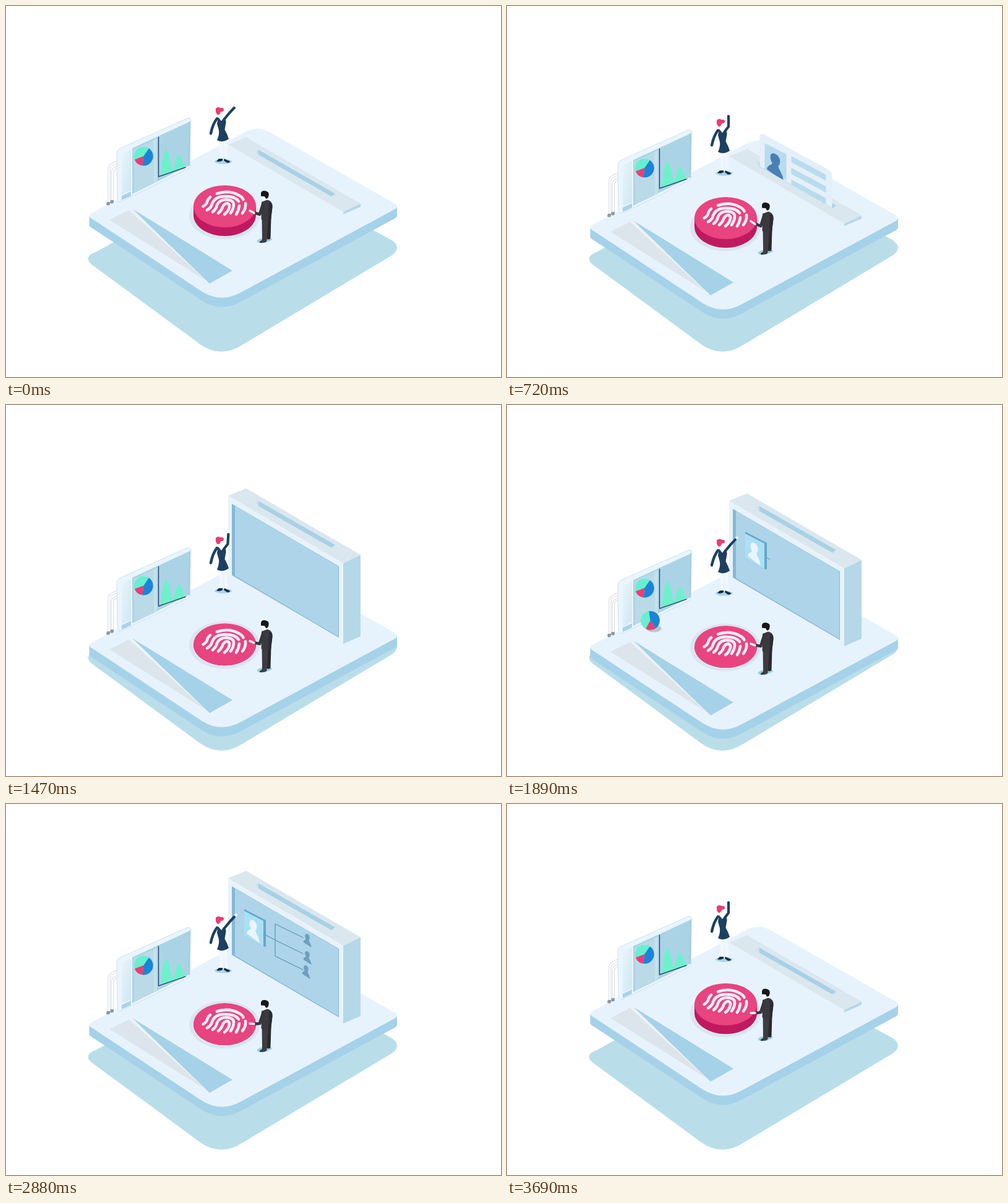
An HTML page for the animation above (3.72 s loop, 800 px wide and 600 px high).

```html
<!DOCTYPE html>
<html lang="en">
<head>
<meta charset="utf-8">
<title>Isometric access platform</title>
<style>
html, body { margin: 0; width: 100%; height: 100%; overflow: hidden; background: #fff; }
svg { display: block; width: 800px; height: 600px; }
.line { fill: none; stroke-linecap: round; stroke-linejoin: round; }
</style>
</head>
<body>
<svg viewBox="0 0 800 600" xmlns="http://www.w3.org/2000/svg">
  <defs>
    <path id="slab" d="M142 333C132 338 132 340 142 346L317 462Q348 481 380 463L624 331Q640 324 624 317L424 203Q407 194 388 203Z"/>
    <g id="pie">
      <circle r="15.3" fill="#66f0d0"/>
      <path d="M0 0L8.6-12.7A15.3 15.3 0 0 1-1.9 15.2Z" fill="#1c84d8"/>
      <path d="M0 0L-1.9 15.2A15.3 15.3 0 0 1-14.4 5.2Z" fill="#ee3c74"/>
    </g>
    <path id="bust" d="M-7 10C-7 5-3 4-2.5 1C-5-2-5-10 0-10C5-10 5-2 2.5 1.5C3 5 7 8 7 15Z"/>
    <clipPath id="slotClip"><path d="M380-400H640V373L408 240L380 224Z"/></clipPath>
    <clipPath id="rampClip"><path d="M100 200H420V507L167 346H100Z"/></clipPath>
    <clipPath id="screenClip"><polygon id="screenCut"/></clipPath>
    <linearGradient id="glass" x1="0" y1="0" x2="1" y2="1">
      <stop offset="0" stop-color="#e9f5fb"/><stop offset="1" stop-color="#cfe6f2"/>
    </linearGradient>
  </defs>

  <path fill="#b9deea" d="M145 398C130 403 129 412 141 420L315 548Q348 570 382 548L624 403Q640 391 624 379L400 258Z"/>

  <g id="deck">
    <use href="#slab" y="15" fill="#a5d2e9"/>
    <path d="M134.5 340L632 324V339L134.5 355Z" fill="#a5d2e9"/>
    <use href="#slab" fill="#e7f3fc"/>

    <!-- ramp -->
    <path d="M167 346L203 327L366 428L329 449Z" fill="#edf2f6"/>
    <path d="M167 346L199 330L323 444Z" fill="#dde5ec"/>
    <path d="M204 328L366 428L329 449Z" fill="#a5d2e8"/>

    <!-- dashboard -->
    <g class="line" stroke="#d8dde2" stroke-width="4.5">
      <path d="M166.5 317V264Q167 256 180 253M172 314V269Q172 263 182 260"/>
      <path d="M166.5 316V264Q167 256 180 253M172 313V269Q172 263 182 260" stroke="#fff" stroke-width="2.4"/>
    </g>
    <path d="M163 317h5v4q-3 3-6 0ZM169 314h5v4q-3 3-6 0Z" fill="#8f979f"/>
    <path d="M179 239Q179 233 185 230L292 182Q299 180 299 187L297.5 259Q297 262 295 263L189 315Q180 319 180 312Z" fill="#eaf5fc" stroke="#c9e3f0"/>
    <path d="M187 239L202 232V298L187 305Z" fill="url(#glass)"/>
    <path d="M187 307L202 300V307L187 314Z" fill="#a9d2e9"/>
    <path d="M204 230L297 187L296 258L204 304Z" fill="#abd3e6"/>
    <path d="M206 232L238 217L239 287L207 302Z" fill="#bbdae8"/>
    <path d="M238 217L244 214V285L239 287Z" fill="#c4e1ee"/>
    <path d="M250 274C252 248 256 233 259 233C264 234 266 255 269 265C273 263 275 242 279 241C284 241 286 255 290 261Z" fill="#6ff0cc"/>
    <path class="line" d="M246.5 212V276L290 261" stroke="#24496b" stroke-width="1.4"/>
    <path class="line" d="M297 187L296 258" stroke="#8bb9cd"/>
    <use href="#pie" x="222.3" y="243"/>

    <!-- button -->
    <ellipse cx="353" cy="339" rx="57" ry="38.5" fill="#d9e6f1"/>
    <path id="side" fill="#c01960"/>
    <g id="cap">
      <ellipse cx="353.5" cy="324" rx="50.5" ry="34" fill="#e8447f"/>
      <g class="line" stroke="#f1eef6" stroke-width="4.6">
        <path d="M341 303.5Q360 297 376 306Q382 309 383.5 313"/>
        <path d="M318.5 324Q324 321 325 317Q326 312 330 309"/>
        <path d="M325 330Q332 326 333 320Q337 309 351 308Q370 307 376 316"/>
        <path d="M334 333Q340 328 341 322Q345 313 356 313Q368 314 368 321Q368 328 363 335"/>
        <path d="M343 335Q349 330 350 325Q353 319 358 319Q362 321 361 325Q359 333 353 337"/>
        <path d="M387 319Q388 328 382 335M377 323Q376 331 372 337"/>
      </g>
    </g>

    <!-- wall -->
    <polygon id="wallSide" fill="#b5d8e8"/>
    <polygon id="wallFront" fill="#e8f2fa"/>
    <g id="screen">
      <polygon id="screenEdge" fill="#85b9d2"/>
      <polygon id="screenFace" fill="#add4e8"/>
      <g clip-path="url(#screenClip)"><g id="chart">
        <g id="portrait">
          <path d="M385 152L420 170V213L416 212L385 195Z" fill="#64a8c9"/>
          <path d="M385 155L416 171V212L385 195Z" fill="#abdff6"/>
          <use href="#bust" fill="#eaf5fb" transform="translate(399.5 183) skewY(24) scale(1.45 1.3)"/>
        </g>
        <path id="links" class="line" stroke="#5f99ba" stroke-width="1.2"/>
        <g id="team" fill="#6d9fc0"></g>
      </g></g>
    </g>
    <g id="wallTop">
      <path d="M359 224L388 212L573 319.5L545 333Z" fill="#dae7ef"/>
      <path d="M403 235L408 232.5L532 303.5L526 308L407 240V237Z" fill="#a8d1e5"/>
      <path d="M403 235L408 232.5V240Z" fill="#c9e1ec"/>
    </g>

    <!-- card: top left corner at 0,0 -->
    <g clip-path="url(#slotClip)"><g id="card">
      <path d="M0 5Q0-2 7 1L111 58Q117 62 117 68V128L0 62Z" fill="#e4f0f9"/>
      <path d="M8 15L43 33V75L8 59Z" fill="#b8dced"/>
      <use href="#bust" fill="#4a7fb3" transform="translate(25 48) skewY(24) scale(1.9 1.55)"/>
      <path d="M51 36L107 66V76L51 46ZM51 55L107 85V95L51 65ZM51 74L107 104V114L51 84Z" fill="#b8dced"/>
    </g></g>

    <!-- rolling pie -->
    <g clip-path="url(#rampClip)"><g id="roller">
      <ellipse id="rollShade" cy="13" rx="12" ry="6" fill="#b7c7d3"/>
      <use id="rollPie" href="#pie"/>
    </g></g>

    <!-- woman -->
    <ellipse cx="351" cy="251.5" rx="14" ry="4" fill="#a8d5ea"/>
    <path d="M344 216L346 248H350L351 219L354 248H358L357 215ZM329 206L328 211L332 212L334 207Z" fill="#f1f8fd"/>
    <path d="M344 247L340 251Q345 253 350 250L350 247ZM353 247L352 250L357 253.5Q362 254 362 251L357 249Z" fill="#182c43"/>
    <path d="M345 170h6v7l-3 2v4h-4Z" fill="#fdfeff"/>
    <path d="M339 166Q342 162 347 165Q352 164 352 168Q352 171 347 171Q346 176 342 176Q338 173 339 166Z" fill="#ea3c70"/>
    <path d="M343 180L348 186L352 181Q357 184 355 191L353.5 200Q358 208 360 215Q350 222 341 217Q345 208 344 201L341 190Z" fill="#1d4061"/>
    <path class="line" d="M341 182Q334 191 331 206" stroke="#1d4061" stroke-width="4.4"/>
    <path id="wave" class="line" stroke="#1d4061" stroke-width="4.2"/>
    <circle id="palm" r="2.4" fill="#f7fbff"/>

    <!-- man -->
    <path d="M406 379Q414 373 426 375Q434 377 426 380Q416 386 406 382Z" fill="#9acfe3"/>
    <path d="M420 342H428.5L427.5 376Q424 379 421 376Z" fill="#29292e"/>
    <path d="M413.5 342H424L421.5 380Q420 383.5 410 383V381L414 378Z" fill="#3d3c43"/>
    <path d="M414 306h8v7l-4 4l-4-3Z" fill="#f9fbfd"/>
    <path d="M412 303Q413 298 419 299Q426 300 424.5 307Q423.5 312 420 311.5L418 308L412 307.5Z" fill="#17181c"/>
    <path d="M413 317L422 313.5Q431 315 430.5 325L428 346Q420 349 412.5 345Z" fill="#3a3940"/>
    <path d="M425 317Q431 317 430.5 326L428 346L424 347Z" fill="#2c2b31"/>
    <path id="sleeve" class="line" stroke="#36353c" stroke-width="4.6"/>
    <path id="hand" class="line" stroke="#f8fafc" stroke-width="3.4"/>
  </g>
</svg>

<script>
const LOOP = 3720, RISE = 122;
const $ = id => document.getElementById(id);
const set = (id, name, value) => $(id).setAttribute(name, value);
const move = (id, x, y) => set(id, "transform", `translate(${x} ${y})`);
const clamp = x => Math.max(0, Math.min(1, x));
const smooth = x => x * x * (3 - 2 * x);
const linear = x => x;
const span = (t, a, b) => clamp((t - a) / (b - a));
const mix = (a, b, k) => a + (b - a) * k;

// value at t from [time, value] stops
function track(t, stops, ease = smooth) {
  let i = 1;
  while (i < stops.length - 1 && t > stops[i][0]) i++;
  const [a, b] = [stops[i - 1], stops[i]];
  return mix(a[1], b[1], ease(span(t, a[0], b[0])));
}

// ease with level ends; p and q are the horizontal handles
function curve(x, p, q) {
  let lo = 0, hi = 1;
  for (let i = 0; i < 24; i++) {
    const s = (lo + hi) / 2, r = 1 - s;
    if (3 * r * r * s * p + 3 * r * s * s * q + s * s * s < x) lo = s; else hi = s;
  }
  return smooth(lo);
}

const spots = [[487, 202], [487, 230], [485, 253]];
$("team").innerHTML = spots.map(([x, y]) =>
  `<use href="#bust" transform="translate(${x} ${y - 2}) skewY(20) scale(.92 .78)"/>`).join("");

function drawWall(h) {
  const top = 237 - h;
  set("wallFront", "points", `359,${224 - h} 545,${333 - h} 545,337 359,229`);
  set("wallSide", "points", `545,${333 - h} 573,${319.5 - h} 573,325 545,337`);
  move("wallTop", 0, -h);
  set("screen", "visibility", h > 13 ? "visible" : "hidden");
  const face = `365,${top} 538,${top + 101} 538,327 365,226`;
  set("screenEdge", "points", face);
  set("screenCut", "points", face);
  set("screenFace", "points", `370,${top + 3} 537,${top + 101} 537,325 370,227`);
  move("chart", 0, RISE - h);
}

function drawChart(t) {
  set("portrait", "opacity", span(t, 1580, 1760));
  const stem = span(t, 1860, 1960), post = span(t, 1960, 2100), arm = span(t, 2100, 2480);
  const up = 202 - 26 * post, down = 202 + 26 * post;
  const x = 435 + 45 * arm;
  let d = "";
  if (stem > 0) d += `M420 194L${420 + 15 * stem} ${194 + 8 * stem}`;
  if (post > 0) d += `M435 ${up}V${down}`;
  if (arm > 0) for (const y of [up, 202, down]) d += `M435 ${y}L${x} ${y + 22 * arm}`;
  set("links", "d", d);
  [...$("team").children].forEach((el, i) =>
    el.setAttribute("opacity", span(t, 2460 + i * 70, 2580 + i * 70)));
}

function drawPeople(t) {
  const out = track(t, [[0, 1], [420, 0], [1400, 0], [1720, 1], [3080, 1], [3420, 0], [LOOP, 0]]);
  const ex = mix(358, 361, out), ey = mix(176, 173, out);
  const hx = mix(358, 369, out), hy = mix(159, 164.5, out);
  set("wave", "d", `M352 184L${ex} ${ey}L${hx} ${hy}`);
  set("palm", "cx", hx + mix(0.5, 2.5, out));
  set("palm", "cy", hy - mix(4, 3, out));

  const y = track(t, [[0, 331], [720, 329], [1140, 332], [1890, 333], [2370, 328], [2880, 337], [3690, 338], [LOOP, 338]]);
  const wx = 403, wy = mix(338, y, 0.45);
  set("sleeve", "d", `M415 321L410 337L${wx} ${wy}`);
  set("hand", "d", `M${wx - 2} ${wy}L394 ${y}`);
}

function draw(t) {
  const lift = t < 1800
    ? 54 * smooth(t / 1800)
    : 54 * (1 - curve(span(t, 1800, 3660), 0.186, 0.687));
  move("deck", 0, lift);

  const press = track(t, [[0, 0], [790, 0], [980, 14], [3040, 14], [3320, 0], [LOOP, 0]]);
  const y = 324 + press;
  move("cap", 0, press);
  set("side", "d", `M303 ${y}V338A50.5 34 0 0 0 404 338V${y}Z`);

  drawWall(track(t, [[0, 0], [960, 0], [1340, 134], [1560, RISE], [3030, RISE], [3400, 0], [LOOP, 0]]));
  drawChart(t);

  const drop = 1 - Math.pow(1 - span(t, 0, 960), 1.25);
  move("card", 408.5, -140 + 398 * drop);
  set("card", "visibility", t > 0 && t < 960 ? "visible" : "hidden");

  const px = track(t, [[1700, 222], [1890, 231.5], [2370, 239.5], [2800, 292]], linear);
  const py = track(t, [[1700, 243], [1890, 295.5], [2370, 365], [2800, 455]], linear);
  move("roller", px, py);
  set("roller", "visibility", t > 1700 && t < 2800 ? "visible" : "hidden");
  set("rollPie", "transform", `rotate(${track(t, [[1700, 0], [1890, -42], [2370, -25], [2800, 30]], linear)})`);
  set("rollShade", "cx", track(t, [[1890, 6], [2370, -6]], linear));
  set("rollShade", "opacity", span(t, 1760, 1880));

  drawPeople(t);
}

const start = performance.now();
function tick(now) {
  const t = Math.max(0, now - start) % LOOP;
  draw(Math.floor(t / 30) * 30);
  requestAnimationFrame(tick);
}
draw(0);
requestAnimationFrame(tick);
</script>
</body>
</html>
```
